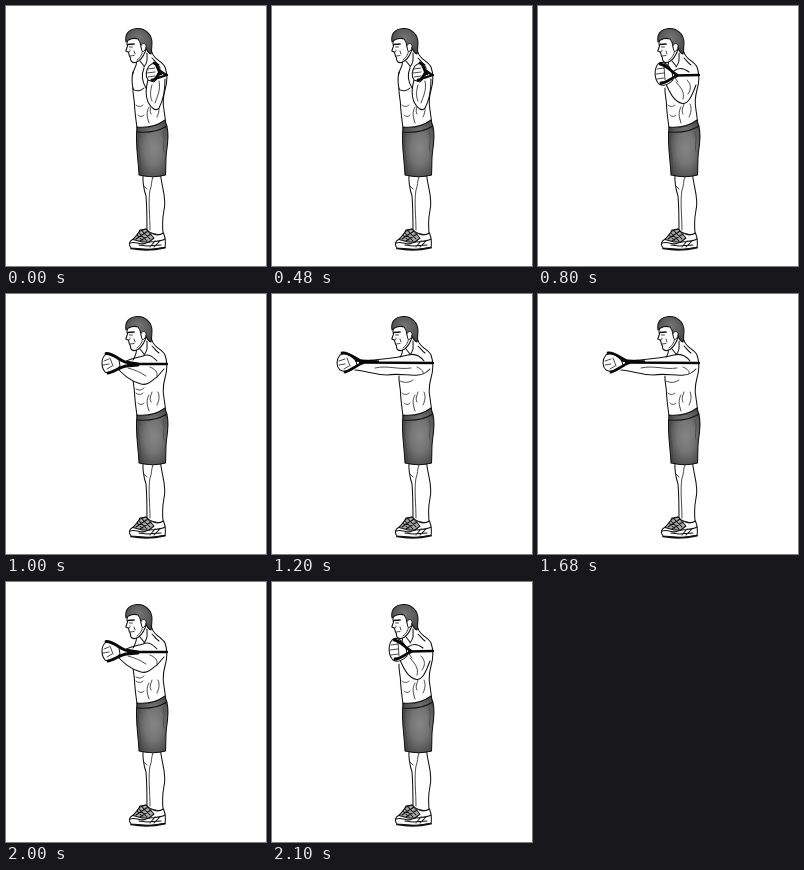
Write an HTML page that moves like this. It is 260 px wide and 260 px high and loops after 2200 ms.

```html
<!DOCTYPE html>
<html lang="en">
<head>
<meta charset="utf-8">
<title>Band chest press</title>
<style>
  html, body { margin: 0; width: 100%; height: 100%; overflow: hidden; background: #fff; }
  svg { display: block; width: 100vw; height: 100vh; }
  path { fill: none; stroke: #111; stroke-width: 1.05; stroke-linecap: round; stroke-linejoin: round; }
  .skin { fill: #fff; }
  .flesh { fill: #fff; stroke: none; }
  .thin { stroke: #1c1c1c; stroke-width: .8; }
  .band { stroke: #080808; stroke-width: 2.3; }
  .grip { stroke: #080808; stroke-width: 2.8; }
  .pose { visibility: hidden; animation: 2200ms step-end infinite; }
  #rest { animation-name: rest; }
  #start { animation-name: start; }
  #mid { animation-name: mid; }
  #reach { animation-name: reach; }
  @keyframes rest { 0% { visibility: visible } 36.36%, 100% { visibility: hidden } }
  @keyframes start {
    0% { visibility: hidden } 36.36% { visibility: visible }
    45.45% { visibility: hidden } 95.45%, 100% { visibility: visible }
  }
  @keyframes mid {
    0% { visibility: hidden } 45.45% { visibility: visible } 54.54% { visibility: hidden }
    90.9% { visibility: visible } 95.45%, 100% { visibility: hidden }
  }
  @keyframes reach {
    0% { visibility: hidden } 54.54% { visibility: visible } 90.9%, 100% { visibility: hidden }
  }
</style>
</head>
<body>
<svg viewBox="0 0 260 260">
  <defs>
    <radialGradient id="cloth" cx=".55" cy=".5" r=".62">
      <stop offset="0" stop-color="#858585"/>
      <stop offset=".45" stop-color="#757575"/>
      <stop offset="1" stop-color="#444"/>
    </radialGradient>
    <radialGradient id="hair" cx=".5" cy=".4" r=".65">
      <stop offset="0" stop-color="#777"/>
      <stop offset="1" stop-color="#484848"/>
    </radialGradient>
  </defs>

  <g id="legs">
    <path class="skin" d="M137 168C136.500 177 138 184 140 190C141 201 141 214 141 226L157.500 230C156 221 156.500 212 158 204C161 193 156 183 154.500 168Z"/>
    <path class="thin" d="M147 171C145 175 146 180 144 184C142 195 144 210 144 224M138 180L141 183"/>
  </g>

  <g id="shoes">
    <path class="skin" d="M134 224C132 229 128 233 124.500 235C123 237 123.500 240 125 242L145 243.500L159 241.500C160 236 159 231 157.500 227C151 231 145 228 140 223Z"/>
    <path style="fill:#aaa" d="M134 225L140 223L148 232L143 236L136 236L127 233.500Z"/>
    <path d="M131 229L137 235M133 227L141 235M136 225L144 233M130 233L142 225M134 235L145 228"/>
    <path d="M124 237C131 235 135 240 140 237C146 234 152 237 159 233M144 241L149 235M148 241L154 235M133 239L141 240L155 239"/>
    <path style="stroke-width:1.700" d="M125 242.500C136 244.500 149 244 159 241.700"/>
  </g>

  <g id="torso">
    <path class="flesh" d="M131 54C130 61 126 65 126 75C125.500 83 128 90 128.500 98L131 123L160 116L158 92L160 66C157 58 150 55 146 46Z"/>
    <path d="M127 82C126.500 88 128.500 93 128.500 99C129 108 130 114 131 122M146 46C147 53 156 55 159 61C162 69 161 77 159 84C157 91 157 99 158 104L159.500 115"/>
    <path d="M130.500 56C131 60 127 64 126.500 69M141 47C141 53 142 56 138 61M134 55L138 60M146 52C149 55 150 57 153 59"/>
    <path class="thin" d="M130 99C132 101 135 101 137 99M132 109C134 111 136 111 138 109M143 101C140 106 141 111 143 117M146 98C145 102 143 104 145 108M152 98C154 102 153 107 151 111"/>
  </g>

  <g id="shorts">
    <path style="fill:url(#cloth)" d="M131 121C141 122 151 120 159 114L161 121C163 128 162 136 160.500 146C159.500 154 160 162 159.500 169C151 171.500 141 171 133 169C132.500 154 129 138 131 121Z"/>
    <path d="M131 126C141 127 153 125 161 120"/>
    <path class="thin" style="stroke:#444" d="M133 128C131 142 135 152 135 167M157 126C160 133 156 139 158 146"/>
  </g>

  <g id="head">
    <path class="skin" d="M121.500 32L121 38L121.500 40L119.800 45L122.500 46.300L123 48.500L123.500 50L124.500 52C124 55 126.500 57.500 130 56.300C134 55 137 51 139 46L142 37L134 29Z"/>
    <path style="fill:url(#hair)" d="M120 36C118.500 28 123 23 131 22.500C140 22 146 29 146 37C145.500 41 146 45 145 48C142 47 141 45 139.500 41L136 44C134.500 40 135 36 132 33C128 31.500 123 33 120 36Z"/>
    <path class="skin" style="stroke-width:.8" d="M135 40C136 36 140 37 140 40.500C139.500 44 137.500 47 136 45Z"/>
    <path style="stroke-width:1.700" d="M122 38.500L128 38"/>
    <path class="thin" d="M123.500 41L126.500 41M122.500 46C124 46 124.500 45 124 44M124 50L128 49.500M128 45L129 48M136.500 45C136 49 134 52 131 54"/>
  </g>

  <g id="rest" class="pose">
    <path d="M127 66C125.500 72 126 78 127 83M127 83C130 86 135 85 138 82M138 62C135 69 137 77 140 82"/>
    <path class="flesh" d="M142 73C140 81 138 90 143 97C145 102 149 106 153 102C157 95 159 82 158 71L152 69Z"/>
    <path d="M142 74C140 81 139 89 142 96C145 102 150 106 153 102C157 95 159 83 159 73"/>
    <path class="thin" d="M153 75C155 84 151 91 149 97M146 79C144 85 144 91 146 95"/>
    <path class="skin" d="M143 60C140 64 139 70 142 74L148 76L153 71L154 62C151 56 147 56 143 60Z"/>
    <path class="thin" d="M142 63L149 62M141 67L149 66M142 71L149 70"/>
    <path class="grip" d="M148 57C153 59 151 65 155 68M146 74C151 74 151 69 154 66"/>
    <path class="band" d="M152 72L161 69M153 64L160 69"/>
  </g>

  <g id="start" class="pose">
    <path class="flesh" d="M129 77C131 84 134 91 139 96C143 99 148 98 151 94C155 89 157 79 157 68C153 62 149 61 144 66L133 66Z"/>
    <path d="M128 78C131 85 134 92 139 95C144 99 148 98 151 94C154 90 156 84 158 79M136 65C141 61 146 62 151 66"/>
    <path class="thin" d="M138 76C143 82 147 86 145 93M149 74C154 79 153 84 150 88M137 72L140 76"/>
    <path class="skin" d="M120 58C116 63 116 73 121 78C126 81 131 78 135 74C135 68 133 61 128 58C125 56 122 56 120 58Z"/>
    <path class="thin" d="M119 63L126 62M118 68L126 67M119 73L126 72M126 60L127 74"/>
    <path class="grip" d="M122 58C129 59 132 65 139 69M123 77C130 77 132 72 139 70"/>
    <path class="band" d="M137 69.500L161 69"/>
  </g>

  <g id="mid" class="pose">
    <path class="flesh" d="M111 72C118 80 126 88 135 91C142 92 149 86 156 78L157 66C151 60 145 65 137 64L116 69Z"/>
    <path d="M112 75C118 81 124 87 135 90C142 92 146 86 151 83L158 75M119 68C125 64 131 64 137 62C143 59 147 63 151 67"/>
    <path class="thin" d="M122 74C129 76 134 78 140 82M144 73C149 75 152 78 151 82M130 95C133 97 136 96 138 94"/>
    <path class="skin" d="M99 61C95 65 95 73 99 78C104 80 111 76 114 72L113 66C109 61 103 58 99 61Z"/>
    <path class="thin" d="M98 67L103 65M97 71L103 70M101 75L106 72M104 64L107 72"/>
    <path class="grip" d="M100 59.500C107 59 113 66 119 68L132 70M102 79C108 78 114 73 120 72L132 71"/>
    <path class="band" d="M122 70L161 70"/>
  </g>

  <g id="reach" class="pose">
    <path class="flesh" d="M82 70L101 67C116 67 124 65 136 61C147 57 156 60 157 69C157 77 155 82 148 82C138 82 128 79 116 81C105 81 95 77 83 76Z"/>
    <path d="M83 76C94 77 105 81 115 81C127 79 137 82 146 81C151 81 155 78 158 75M92 67C107 65 121 65 136 61C143 59 148 62 152 67"/>
    <path class="thin" d="M103 74C116 71 126 76 139 74M145 73C150 75 152 78 151 80M128 87C132 89 137 89 141 86"/>
    <path class="skin" d="M68 61C64 66 64 72 68 76C74 79 81 76 85 72L84 67C79 61 73 58 68 61Z"/>
    <path class="thin" d="M67 67L73 65M67 71L73 70M72 75L77 72M75 64L78 72"/>
    <path class="grip" d="M70 59C77 58 83 65 91 68M73 78C79 77 84 71 91 69"/>
    <path class="band" d="M88 68.500L161 69M84 66.500L106 67.500"/>
  </g>
</svg>
</body>
</html>
```
